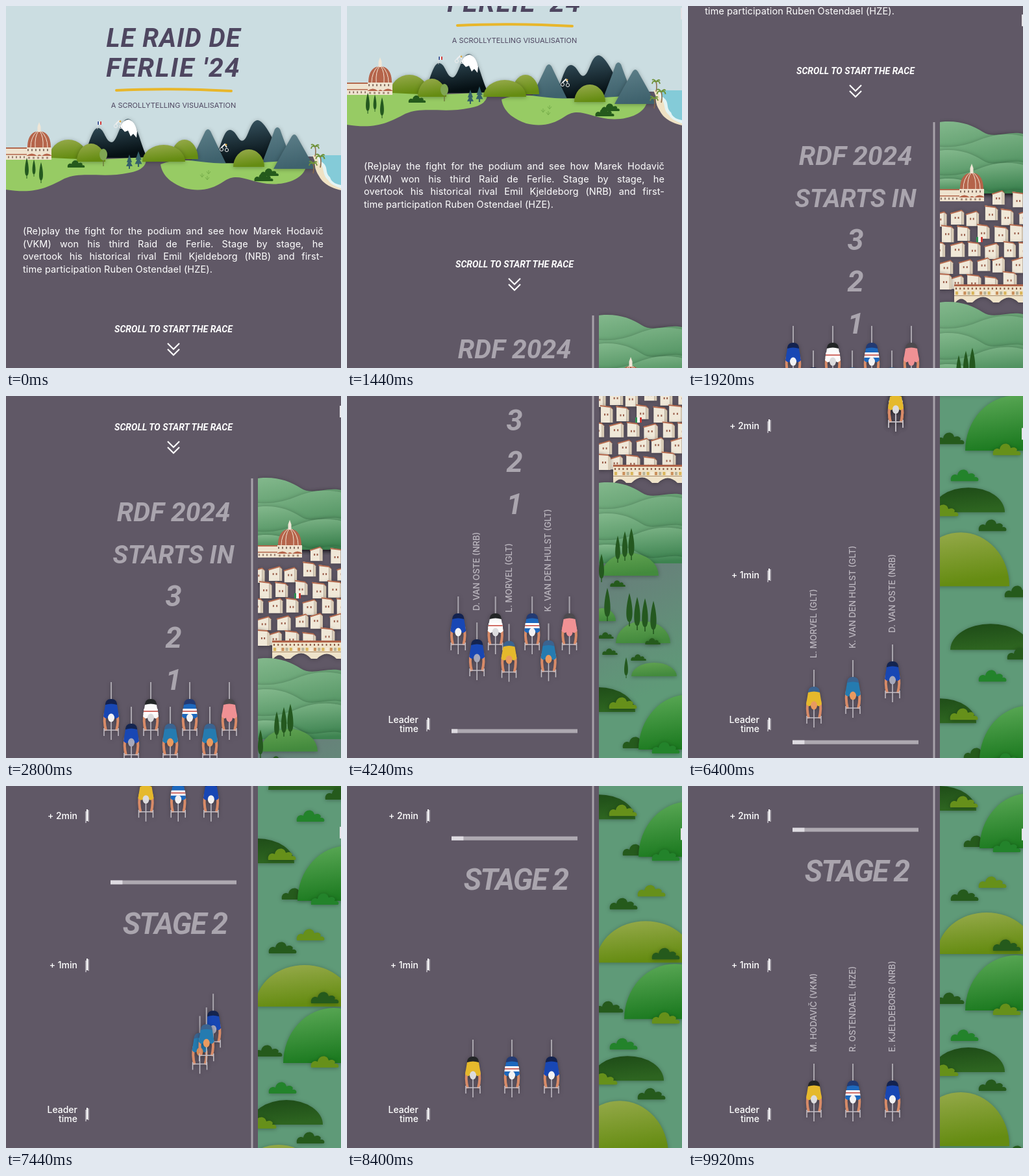
An HTML page for the animation above (10 s loop, 516 by 558 pixels).

```html
<!DOCTYPE html>
<html lang="en">
<head>
<meta charset="utf-8">
<title>Race story</title>
<style>
  html, body { margin: 0; width: 100%; height: 100%; overflow: hidden; background: #605866; }
  svg { position: absolute; left: 0; top: 0; width: 516px; height: 558px; overflow: hidden; font-family: Inter, sans-serif; }
  .brush { font-family: Roboto, sans-serif; font-weight: 700; font-style: italic; text-anchor: middle; }
  .pale { fill: #aaa5ae; }
  .mid { text-anchor: middle; }
  .end { text-anchor: end; font-size: 14px; font-weight: 500; fill: #fff; }
  .name { font-size: 13px; font-weight: 500; fill: #bdb8c0; }
  .soft { filter: drop-shadow(0 1px 3px rgba(0, 0, 0, .3)); }
  p { margin: 0; font: 400 14.5px/19.7px Inter, sans-serif; letter-spacing: .1px; color: #fff; }
  p span { display: block; white-space: nowrap; text-align: justify; text-align-last: justify; }
  p span:last-child { text-align-last: left; }
</style>
</head>
<body>
<svg viewBox="0 0 516 558">
  <defs id="defs">
    <clipPath id="strip"><rect x="388" y="560" width="128" height="2200"/></clipPath>
    <g id="dome">
      <path d="M-63-17H-18V0H-63Z" fill="#efe3cf"/>
      <path d="M-63-17l3-2H-18v2ZM-63-9H-18v1.5H-63Z" fill="#b3674c"/>
      <path d="M-60-4H-20" stroke="#91796a" stroke-width="3" stroke-dasharray="2 4"/>
      <path d="M-19-19H19V0H-19Z" fill="#efe3cf"/>
      <path d="M-18-19C-18-34-12-44 0-44C12-44 18-34 18-19Z" fill="#b5644a"/>
      <path d="M-6-19Q-7-36-1-44M6-19Q7-36 1-44M-13-19Q-13-35-3-44M13-19Q13-35 3-44" fill="none" stroke="#f3e7d6"/>
      <path d="M-2.5-43V-51L0-58L2.5-51V-43Z" fill="#f0e6d6"/>
      <path d="M-18-15H18" stroke="#7e675b" stroke-width="3" stroke-dasharray="2 4"/>
      <path d="M-20-6Q-11-13-3-6Q0-10 4-6Q12-13 20-6Z" fill="#b5644a"/>
      <path d="M-17-3H17" stroke="#a38b78" stroke-width="3" stroke-dasharray="3 4"/>
    </g>
    <path id="bush" d="M-21 0C-23-9-15-12-11-9C-10-19 4-21 6-11C12-14 18-10 15-6C23-7 22 0 20 0Z"/>
    <path id="cypress" d="M-.6 0V-5C-5-7-4-24 0-38C4-24 5-7 .6-5V0Z" fill="#24581f"/>
    <path id="pine" d="M-1 0V-4H-5L-2-10H-4L0-22L4-10H2L5-4H1V0Z" fill="#35606a"/>
    <g id="palm">
      <path d="M0 0Q2-8 0-15" stroke="#8a6a48" stroke-width="1.5" fill="none"/>
      <path d="M0-15Q-5-18-6-12M0-15Q5-18 6-12M0-15Q-3-20-6-18M0-15Q4-20 6-17" stroke="#6f9239" stroke-width="1.8" fill="none"/>
    </g>
    <g id="speck" stroke-width="1" fill="none">
      <circle cx="-4" cy="3" r="2.6" stroke="#eee"/><circle cx="4" cy="4" r="2.6" stroke="#eee"/>
      <path d="M-4 0L1-5L4 0" stroke="#eee" stroke-width="2"/><circle cx="3" cy="-4" r="1.4" fill="#d9a741"/>
    </g>
  </defs>
  <g id="page">
    <g id="hero"></g>
    <foreignObject x="26" y="337" width="463" height="84">
      <p xmlns="http://www.w3.org/1999/xhtml"><span>(Re)play the fight for the podium and see how Marek Hodavič</span><span>(VKM) won his third Raid de Ferlie. Stage by stage, he</span><span>overtook his historical rival Emil Kjeldeborg (NRB) and first-</span><span>time participation Ruben Ostendael (HZE).</span></p>
    </foreignObject>
    <g id="course"></g>
    <g id="map" clip-path="url(#strip)"></g>
  </g>
  <g id="race"></g>
  <rect id="thumb" x="514" width="2" height="18" fill="#e4e2e6"/>
</svg>
<script>
const $ = id => document.getElementById(id);
const DARK = '#255a1c', OLIVE = '#66901a', GREEN = '#23832b';
const TILE = 728;

// ---------- drawing helpers ----------
const grad = (id, a, b) =>
  `<linearGradient id="${id}" x1="0" y1="0" x2="0.25" y2="1"><stop stop-color="${a}"/><stop offset="1" stop-color="${b}"/></linearGradient>`;
const path = (d, fill, more = '') => `<path d="${d}" fill="${fill}" ${more}/>`;
const rect = (x, y, w, h, fill) => `<rect x="${x}" y="${y}" width="${w}" height="${h}" fill="${fill}"/>`;
const use = (id, x, y, s = 1, fill = '') =>
  `<use href="#${id}" transform="translate(${x} ${y}) scale(${s})" fill="${fill}"/>`;
const text = (s, x, y, size, cls, more = '') =>
  `<text x="${x}" y="${y}" font-size="${size}" class="${cls}" ${more}>${s}</text>`;
const hill = (cx, y, rx, ry, fill) =>
  path(`M${cx - rx} ${y}A${rx} ${ry} 0 0 1 ${cx + rx} ${y}Z`, fill, 'class="soft"');
const bush = (x, y, fill, s = 1) => `<g class="soft">${use('bush', x, y, s, fill)}</g>`;
const add = (id, html) => $(id).insertAdjacentHTML('beforeend', html);

function random(seed) {
  return () => (seed = (seed * 16807) % 2147483647) / 2147483647;
}

add('defs',
  grad('olive', '#98ab4d', '#658c12') + grad('green', '#5daa58', '#1c7a20') +
  grad('dark', '#1d4a17', '#2d6420') + grad('knoll', '#62a352', '#438a3d') +
  grad('ridge', '#84b98d', '#3d8350') + grad('rock', '#3b5967', '#061014') +
  grad('cone', '#5e808a', '#3f626d') + grad('plain', '#687c7a', '#5f9a78'));

// ---------- opening scene ----------
function drawHero() {
  const cone = (x, y, w, h) =>
    path(`M${x - w} ${y}Q${x - w * .45} ${y - h * .6} ${x - 4} ${y - h + 3}Q${x} ${y - h - 3} ${x + 4} ${y - h + 3}Q${x + w * .45} ${y - h * .6} ${x + w} ${y}Z`, 'url(#cone)', 'class="soft"');
  const tree = (x, y) => rect(x - .7, y - 12, 1.4, 12, '#6b7a3a') + `<ellipse cx="${x}" cy="${y - 18}" rx="6" ry="9" fill="#7fa653"/>`;
  add('hero',
    path('M0 0H516V250H0Z', '#cbdde1') +
    path('M0 232H516V300H0Z', '#605866') +
    text('LE RAID DE', 258, 63, 40, 'brush', 'fill="#4e4660" letter-spacing="1"') +
    text("FERLIE '24", 258, 109, 41, 'brush', 'fill="#4e4660" letter-spacing="2"') +
    path('M170 130Q250 126 347 131', 'none', 'stroke="#e8b62a" stroke-width="4" stroke-linecap="round"') +
    text('A SCROLLYTELLING VISUALISATION', 258, 156.5, 11, 'mid', 'fill="#4e4660"') +
    path('M118 234C127 220 132 187 142 188C152 189 153 210 163 210C172 209 176 174 188 174C202 176 207 216 218 234Z', 'url(#rock)', 'class="soft"') +
    path('M176 186Q181 175 189 175Q198 177 202 193L201 203L196 197L192 201L188 192L183 194Z', '#fff') +
    path('M318 242C330 225 334 190 345 191C356 192 358 212 366 207C374 202 376 176 388 176C402 178 418 225 434 242Z', 'url(#rock)', 'class="soft"') +
    cone(418, 243, 24, 56) + cone(311, 243, 28, 53) +
    hill(96, 236, 30, 30, 'url(#olive)') + hill(275, 236, 21, 30, 'url(#olive)') +
    path('M0 236Q40 232 90 235T216 233Q218 252 190 257C150 266 118 254 90 266C64 280 44 290 0 283Z', '#97cb64') +
    path('M238 244Q260 234 300 240T440 238L462 248C458 266 432 277 402 274C372 270 356 256 336 270C316 284 296 286 276 281C250 272 240 258 238 244Z', '#97cb64') +
    hill(131, 240, 22, 28, 'url(#olive)') + hill(243, 240, 33, 26, 'url(#olive)') +
    hill(374, 248, 24, 27, 'url(#olive)') + cone(444, 251, 32, 53) +
    path('M472 230H516V284Q490 278 482 262Q474 250 476 240Z', '#efe2c4') +
    path('M479 230H516V281Q500 276 496 268C486 260 492 248 482 242Z', '#e4f4f4') +
    path('M484 230H516V276Q502 274 499 264C490 256 498 248 486 240Z', '#84cbd8') +
    use('palm', 476, 232) + use('palm', 484, 249, 1.1) + use('palm', 473, 258) +
    use('dome', 51, 237) +
    use('cypress', 32, 266, .85) + use('cypress', 43, 263, .7) + use('cypress', 54, 273, .85) +
    use('bush', 108, 249, .62, DARK) + use('bush', 406, 262, .65, DARK) + use('bush', 397, 270, .68, DARK) +
    tree(150, 247) + use('pine', 190, 251) + use('pine', 204, 248, 1.1) +
    path('M299 260l3 4l3-4M309 255l3 4l3-4M307 264l3 4l3-4M302 258v6M312 253v6M310 262v6', 'none', 'stroke="#76ad4a"') +
    rect(141, 178, 2, 5, '#27458f') + rect(143, 178, 2, 5, '#fff') + rect(145, 178, 2, 5, '#d23a38') + rect(140.5, 178, .8, 12, '#ddd') +
    use('speck', 173, 182) + use('speck', 336, 218) +
    text('SCROLL TO START THE RACE', 258, 503, 14, 'brush', 'fill="#fff"') +
    path('M249 520l9 9l9-9M249 529l9 9l9-9', 'none', 'stroke="#fff" stroke-width="2.2"'));
}

// ---------- countdown and stage banners ----------
function drawCourse() {
  const lines = [['RDF 2024', 643, 41], ['STARTS IN', 708, 39], ['3', 774, 45], ['2', 838, 45], ['1', 903, 45]];
  add('course', lines.map(([s, y, size]) => text(s, 258, y, size, 'brush pale')).join('') + rect(377.5, 577, 3, 2000, '#a7a2aa'));
  ['STAGE1', 'STAGE 2'].forEach((s, i) => {
    const y = 1234.5 + i * TILE;
    add('course', rect(161, y, 194, 6, '#aea9b1') + rect(161, y, 9.2 * (i + 1), 6, '#dedbe1') +
      text(s, 260, y + 82, 46, 'brush pale', 'letter-spacing="-2"'));
  });
}

// ---------- landscape strip ----------
function ridges(top, n, step, base) {
  let out = '';
  for (let i = 0; i < n; i++) {
    const y = top + i * step;
    const crest = i % 2
      ? `M380 ${y + 10}C410 ${y + 14} 430 ${y + 8} 450 ${y}S496 ${y - 12} 520 ${y - 4}`
      : `M380 ${y - 4}C412 ${y - 10} 436 ${y - 2} 454 ${y + 10}S496 ${y + 6} 520 ${y + 14}`;
    out += path(`${crest}V${base}H380Z`, 'url(#ridge)', 'class="soft"');
  }
  return out;
}

function house(x, y, w, h, a) {
  return `<g transform="translate(${x} ${y})" class="soft">` +
    path(`M0 ${a}L${w} 0V${h}H0Z`, '#f0e8d8') + path(`M${w} 0l4 4V${h}H${w}Z`, '#d8cbb6') +
    path(`M-1 ${a}L${w} -1l5 5l-5-3L-1 ${a + 2}Z`, '#b4694d') +
    rect(w * .35, 10, 2, 3, '#9a5f4c') + rect(w * .65, 10, 2, 3, '#9a5f4c') + '</g>';
}

function city() {
  const rnd = random(77);
  let out = '';
  for (let row = 0; row < 6; row++) for (let col = -1; col < 5; col++) {
    if (row == 0 && col < 3 || row == 5 && col > 3) continue;
    const x = 388 + col * 27 + (row % 2) * 13 + rnd() * 5, y = 682 + row * 25.5 + rnd() * 8;
    out += house(x, y, 14 + rnd() * 4, 20 + rnd() * 4, rnd() < .5 ? 4 : -3);
  }
  out += house(388, 812, 14, 23, -2);
  return out + rect(444, 754, 3, 8, '#2f9150') + rect(447, 754, 4, 8, '#fff') + rect(451, 754, 3, 8, '#cc3a35');
}

function bridge() {
  let out = path('M410 829H516V855H509Q494 840 479 855H470Q455 838 438 855H430Q421 844 412 855H410Z', '#efe3c9', 'class="soft"') + rect(410, 827, 106, 3, '#b0644a');
  for (let i = 0; i < 17; i++)
    out += rect(412 + i * 6.2, 832, 2, 3, '#8c5a48') + rect(412 + i * 6.2, 838, 4, 5, ['#d9b55a', '#f4ead6', '#c98f5a', '#b7b39a'][i % 4]);
  return out + rect(410, 844, 106, 1, '#a98a68');
}

function drawMap() {
  const cypresses = (...list) => list.map(([x, y, s]) => use('cypress', x, y, s)).join('');
  let out = ridges(582, 5, 22, 687) + city() + use('dome', 437, 699) + bridge() +
    ridges(860, 5, 24, 980) +
    rect(388, 979, 128, 221, 'url(#plain)') + rect(388, 1199, 128, 1500, '#5f9a78') +
    hill(436, 998, 44, 35, 'url(#knoll)') +
    cypresses([417, 978, 1.1], [428, 975, 1.2], [438, 974, 1.3], [392, 1008, 1.15]) +
    bush(417, 1015, DARK, .55) + hill(393, 1068, 21, 20, 'url(#knoll)') + cypresses([401, 1068, 1.35]) +
    hill(456, 1102, 42, 34, 'url(#knoll)') +
    cypresses([435, 1076, 1.35], [447, 1082, 1.35], [459, 1084, 1.35], [472, 1088, 1.35]) +
    bush(471, 1104, DARK, .55) + bush(399, 1095, DARK, .55) + bush(405, 1120, DARK, .55) + bush(449, 1129, DARK, .55) +
    cypresses([430, 1156, .85]) + hill(473, 1153, 35, 21, 'url(#knoll)');
  for (let k = 0; k < 2; k++) {
    out += `<g transform="translate(0 ${k * TILE})">` +
      hill(388, 1208, 56, 38, 'url(#dark)') + bush(425, 1203, OLIVE) +
      bush(446, 1264, DARK) + hill(526, 1266, 77, 85, 'url(#green)') + bush(491, 1272, GREEN) +
      bush(469, 1327, OLIVE) + bush(426, 1347, DARK) +
      hill(460, 1429, 76, 64, 'url(#olive)') + bush(491, 1424, DARK) +
      hill(505, 1516, 78, 85, 'url(#green)') + bush(404, 1506, DARK) + bush(491, 1523, OLIVE) +
      bush(426, 1563, GREEN) + hill(432, 1611, 56, 38, 'url(#dark)') + bush(395, 1617, OLIVE) + bush(469, 1640, DARK) +
      hill(420, 1725, 75, 83, 'url(#olive)') + bush(509, 1742, DARK) +
      hill(466, 1823, 62, 40, 'url(#dark)') + bush(513, 1838, DARK) + bush(469, 1872, GREEN) + '</g>';
  }
  add('map', out);
}

// ---------- riders ----------
const YELLOW = '#e5b92c', TEAL = '#257bb0', BLUE = '#1847b4', SKIN = '#e99a5f';
const riders = [
  { x: 344, shorts: '#4d4a4e', jersey: '#f09194', helmet: '#f09194' },
  { x: 162, shorts: '#13224f', jersey: BLUE, helmet: '#f2f2f4', podium: 315, name: 'E. KJELDEBORG (NRB)' },
  { x: 283, shorts: '#233a72', jersey: '#1d68bd', helmet: '#f2f2f4', band: true, podium: 254, name: 'R. OSTENDAEL (HZE)' },
  { x: 223, shorts: '#222526', jersey: '#fafafa', helmet: '#dcdcde', band: true, podium: 194, name: 'M. HODAVIČ (VKM)' },
  { x: 193, shorts: '#14244f', jersey: BLUE, helmet: '#a6a8bb', first: [315, 383], name: 'D. VAN OSTE (NRB)' },
  { x: 253, shorts: '#3b638f', jersey: TEAL, helmet: SKIN, first: [194, 422], name: 'L. MORVEL (GLT)' },
  { x: 314, shorts: '#3b638f', jersey: TEAL, helmet: SKIN, first: [254, 407], name: 'K. VAN DEN HULST (GLT)' }
];

function drawRace() {
  add('race', ['Leader', '+ 1min', '+ 2min'].map((s, i) => `<g class="tick">` +
    (i ? text(s, 110, 5, 14, 'end') : text(s, 110, -2, 14, 'end') + text('time', 110, 12, 14, 'end')) +
    rect(122, -7, 2, 18, '#aaa5ae') + rect(124, -10, 2, 18, '#fff') + rect(126, -9, 2, 18, '#aaa5ae') + '</g>').join(''));
  for (const r of riders) {
    add('race', `<g>` +
      (r.name ? `<text class="name" transform="translate(4 -18) rotate(-90)">${r.name}</text>` : '') +
      `<g class="soft">` + rect(-1, 0, 2, 30, '#a9a5ad') +
      path('M-9 47Q-12 60-8 75M9 47Q12 60 8 75', 'none', 'stroke="#d88b68" stroke-width="4"') +
      path('M-11 74H11M-11 71V83M11 71V83M0 58V89', 'none', 'stroke="#c3bfc6" stroke-width="1.5"') +
      path('M-9 38Q-10 26 0 26Q10 26 9 38Z', r.shorts) +
      path('M-9 35Q0 32 9 35L12 53Q8 58 5 55H-5Q-8 58-12 53Z', r.jersey, 'class="jersey"') +
      (r.band ? path('M-10.5 41H10.5L11.5 49H-11.5Z', '#fff') + path('M-11 45H11', 'none', 'stroke="#c4483f" stroke-width="1.6"') : '') +
      `<ellipse cy="55" rx="5" ry="6.5" fill="${r.helmet}"/></g></g>`);
    r.node = $('race').lastElementChild;
    r.top = r.node.querySelector('.jersey');
    r.bands = [...r.node.querySelectorAll('.jersey ~ path')];
    r.label = r.node.querySelector('text');
  }
}

drawHero(); drawCourse(); drawMap(); drawRace();
const ticks = document.querySelectorAll('.tick');

// ---------- timing ----------
const ease = (t, a, b) => {
  const u = Math.min(1, Math.max(0, (t - a) / (b - a)));
  return u < .5 ? 2 * u * u : 1 - 2 * (1 - u) ** 2;
};
const mix = (a, b, p) => a + (b - a) * p;
const wheel = [[1120, 1400, 100], [1440, 2100, 350], [3200, 3900, 271], [4320, 5200, 270],
  [5480, 6040, 270], [6080, 6640, 270], [6680, 7320, 286], [8000, 8560, 81]];
const scrollAt = t => wheel.reduce((sum, [a, b, d]) => sum + d * ease(t, a, b), 0);

function place(r, t, gap, drop) {
  const out = ease(t, 4000, 5400), across = ease(t, 6700, 7745);
  const parked = 428 - 2.01 * gap;
  let x, y, alpha = 0;
  if (r.first) {
    x = mix(mix(r.x, r.first[0], out), 320, across);
    y = mix(mix(347, r.first[1], out), -140, ease(t, 7195, 8195));
    alpha = ease(t, 3800, 4160) - ease(t, 6500, 6900);
  } else {
    x = mix(r.x, 320, out);
    y = mix(309, parked, ease(t, 4240, 5400));
    if (r.podium) {
      x = mix(x, r.podium, across);
      y = mix(y, 428, ease(t, 7440, 8640));
      alpha = ease(t, 8400, 8800);
    } else r.node.setAttribute('opacity', 1 - ease(t, 5500, 5900));
  }
  r.node.setAttribute('transform', `translate(${x} ${y + drop})`);
  if (r.label) r.label.setAttribute('opacity', alpha);
}

function draw(t) {
  const s = scrollAt(t), drop = Math.max(0, 582 - s);
  const gap = mix(560, 230, ease(t, 4240, 5700));
  $('page').setAttribute('transform', `translate(0 ${-s})`);
  ticks.forEach((n, i) => {
    n.setAttribute('transform', `translate(0 ${506 - i * gap + drop})`);
    n.setAttribute('opacity', i && t < 4240 ? 0 : 1);
  });
  riders.forEach(r => place(r, t, gap, drop));

  const [, , , leader, , breakaway] = riders;
  breakaway.top.setAttribute('fill', t > 3900 && t < 6800 ? YELLOW : TEAL);
  leader.top.setAttribute('fill', t > 6000 ? YELLOW : '#fafafa');
  leader.bands.forEach(b => b.setAttribute('opacity', t > 6000 ? 0 : 1));

  $('thumb').setAttribute('y', 15 + (s - 450) * .035);
  $('thumb').setAttribute('opacity', t < 1100 || t > 4000 && t < 4400 ? 0 : 1);
}

function frame() {
  const t = performance.now() % 10000;
  draw(Math.floor(t / 80) * 80);
  requestAnimationFrame(frame);
}
frame();
</script>
</body>
</html>
```
